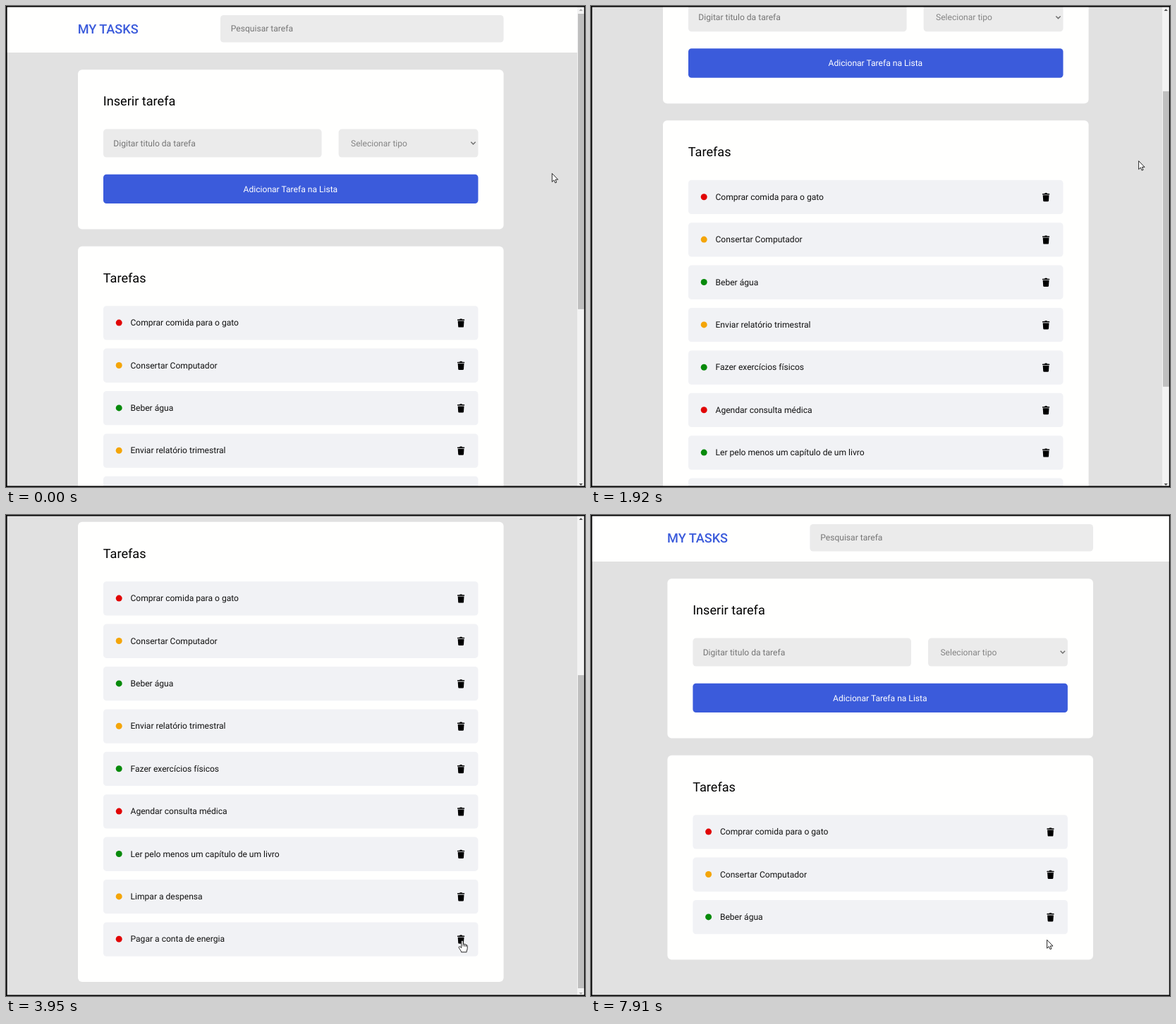
Recreate the animation shown at these times as an HTML page. Size 821 by 682 pixels, loop 8 s.

```html
<!DOCTYPE html>
<html lang="pt-BR">
<head>
<meta charset="utf-8">
<title>My Tasks</title>
<style>
  html, body { margin: 0; width: 100%; height: 100%; overflow: hidden; background: #e1e1e1; }
  svg { display: block; width: 100%; height: 100%; }
  text { font: 400 12.08px Roboto, sans-serif; text-rendering: geometricPrecision; white-space: pre; }
  .head { font-size: 18.12px; }
  .brand { font-size: 18.12px; font-weight: 500; fill: #3b5bdb; }
  .hint { fill: #757575; }
  .field { fill: #ebebeb; }
  .card { fill: #fffffe; }
  .row { fill: #f1f2f5; }
</style>
</head>
<body>
<svg id="stage" viewBox="0 0 821 682"></svg>
<script>
const LOOP = 8000, STEP = 72.2, FIRST = 550;
const PITCH = 60.4, ROW_TOP = 425.2, ROW_H = 48.3;
const VIEW = 680, NOTCH = 75.5;

const RED = '#e10505', AMBER = '#f4a508', GREEN = '#078a0b';
const tasks = [
  ['Comprar comida para o gato', RED],
  ['Consertar Computador', AMBER],
  ['Beber água', GREEN],
  ['Enviar relatório trimestral', AMBER],
  ['Fazer exercícios físicos', GREEN],
  ['Agendar consulta médica', RED],
  ['Ler pelo menos um capítulo de um livro', GREEN],
  ['Limpar a despensa', AMBER],
  ['Pagar a conta de energia', RED],
  ['Organizar a gaveta do quarto', GREEN]
];

// wheel notches: start, duration, distance
const notches = [
  [1050, 200, NOTCH], [1585, 240, NOTCH], [1824, 240, NOTCH],
  [2070, 248, NOTCH], [2320, 240, NOTCH], [2680, 180, 14]
];
const deletions = [3870, 4820, 5540, 6190, 6770, 7340, 7630];

// pointer hot spot: time, x, y
const trail = [
  [0, 774, 237], [500, 774, 237], [694, 776.3, 219.3], [2940, 776.3, 219.3],
  [3570, 647, 603.2], [4560, 647, 603.2], [4600, 646.2, 603.2], [5780, 646.2, 603.2],
  [5810, 646.2, 602.6], [6190, 646.2, 602.6], [6400, 646.8, 605], [6550, 646.4, 603],
  [6770, 646.4, 603], [6900, 646.8, 606], [7050, 646.4, 602.8], [7850, 646.4, 602.8],
  [7900, 646.3, 602], [LOOP, 646.3, 602]
];

const box = (x, y, w, h, r, cls) =>
  `<rect x="${x}" y="${y}" width="${w}" height="${h}" rx="${r}" class="${cls}"/>`;
const label = (x, y, s, cls = '', extra = '') =>
  `<text x="${x}" y="${y}" class="${cls}" ${extra}>${s}</text>`;

const row = ([name, color], i) => `
  <g class="task" transform="translate(0 ${ROW_TOP + i * PITCH})">
    ${box(138, 0, 531.5, ROW_H, 4.5, 'row')}
    <circle cx="160.2" cy="23.9" r="4.5" fill="${color}"/>
    ${label(176.5, 28.1, name, '', 'fill="#111"')}
    <path d="M640 19.7q0-.6.6-.6h2.5l.7-.9h2.6l.7.9h2.5q.6 0 .6.6v.9H640z
      M640.7 21.4h8.8l-.5 7.8q-.1 1.2-1.3 1.2h-5.2q-1.2 0-1.3-1.2z"/>
  </g>`;

const stage = document.getElementById('stage');
stage.innerHTML = `
  <rect width="821" height="682" fill="#e1e1e1"/>
  <g id="page">
    <rect x="-20" y="0" width="860" height="66" fill="#fffffe"/>
    ${label(101.7, 38.6, 'MY TASKS', 'brand')}
    ${box(304, 13, 401.6, 38.5, 4.5, 'field')}
    ${label(318.8, 36.3, 'Pesquisar tarefa', 'hint')}
    ${box(102, 90.2, 603.6, 226.4, 6, 'card')}
    ${label(137.8, 141.2, 'Inserir tarefa', 'head')}
    ${box(138, 174.6, 309.6, 40, 4.5, 'field')}
    ${label(152.3, 198.6, 'Digitar titulo da tarefa', 'hint')}
    ${box(471.6, 174.6, 197.9, 40, 4.5, 'field')}
    ${label(489, 198.6, 'Selecionar tipo', '', 'fill="#858585"')}
    <path d="M659.3 192.8l3.2 3.2 3.2-3.2" fill="none" stroke="#707070" stroke-width="1.5"/>
    <rect x="138" y="238.7" width="531.5" height="41.4" rx="4.5" fill="#3b5bdb"/>
    ${label(403.4, 263.5, 'Adicionar Tarefa na Lista', '', 'text-anchor="middle" fill="#fff"')}
    <rect id="list" x="102" y="340.7" width="603.6" height="10" rx="6" class="card"/>
    ${label(137.8, 391.8, 'Tarefas', 'head')}
    ${tasks.map(row).join('')}
  </g>
  <g id="bar">
    <rect x="810" width="11" height="682" fill="#f3f3f3"/>
    <rect id="thumb" x="811" width="8.8" fill="#bfbfbf"/>
    <path id="up" d="M812.6 7l2.6-3 2.6 3z"/>
    <path id="down" d="M812.6 677l2.6 3 2.6-3z"/>
  </g>
  <path d="M0 0H821V682H0zM1.6 1.5V680.5H819.8V1.5z" fill-rule="evenodd"/>
  <g id="pointer" fill="#fff" stroke="#111" stroke-width=".9" stroke-linejoin="round">
    <path id="arrow" d="M.3 .4V12.3L3 9.8L4.8 13.8L6.7 13L5 9.1H8.7Z"/>
    <path id="hand" d="M-1.3 1.4C-1.3 -.2 1.2 -.2 1.2 1.4V5.4C1.9 4.6 3.3 4.8 3.5 5.8C4.2 5.1 5.5 5.4 5.6 6.5
      C6.4 6.1 7.2 6.7 7.2 7.6V11.5C7.2 13.2 6.1 14.2 6.1 16.6H-1.4C-1.5 14.6 -3.8 12.6 -4.8 10.3
      C-5.3 8.9 -4 8.1 -2.9 9.1L-1.3 10.6ZM1.2 5.2V8.4M3.5 5.8V8.6M5.6 6.5V8.8"/>
  </g>`;

const el = id => document.getElementById(id);
const [page, list, bar, thumb, up, down, pointer, arrow, hand] =
  ['page', 'list', 'bar', 'thumb', 'up', 'down', 'pointer', 'arrow', 'hand'].map(el);
const rows = [...document.querySelectorAll('.task')];

const show = (node, on) => node.setAttribute('display', on ? 'inline' : 'none');
const ease = p => { p = Math.min(1, Math.max(0, p)); return p * p * (3 - 2 * p); };

function pointerAt(t) {
  const i = Math.max(1, trail.findIndex(k => k[0] > t));
  const [t0, x0, y0] = trail[i - 1], [t1, x1, y1] = trail[i];
  const p = ease((t - t0) / (t1 - t0));
  return [x0 + (x1 - x0) * p, y0 + (y1 - y0) * p];
}

function render(t) {
  const s = Math.max(0, FIRST + Math.floor((t - FIRST + 6) / STEP) * STEP);

  const count = tasks.length - deletions.filter(d => t >= d).length;
  const limit = Math.max(0, 391.4 - (tasks.length - count) * PITCH);
  const wheel = notches.reduce((sum, [at, dur, d]) => sum + d * ease((s - at) / dur), 0);
  const scroll = Math.min(wheel, limit);

  page.setAttribute('transform', `translate(${limit ? 0 : 6.4} ${-scroll})`);
  list.setAttribute('height', ROW_TOP + (count - 1) * PITCH + ROW_H + 36.2 - 340.7);
  rows.forEach((r, i) => show(r, i < count));

  show(bar, limit > 0);
  const ratio = 660 / (VIEW + limit);
  thumb.setAttribute('y', 11 + scroll * ratio);
  thumb.setAttribute('height', VIEW * ratio);
  up.setAttribute('fill', scroll > 0.5 ? '#505050' : '#b0b0b0');
  down.setAttribute('fill', scroll < limit - 0.5 ? '#505050' : '#b0b0b0');

  const [x, y] = pointerAt(s);
  const overBin = limit > 0 && y > 595;
  pointer.setAttribute('transform', `translate(${x} ${y})`);
  show(hand, overBin);
  show(arrow, !overBin);
}

const start = performance.now();
function tick() {
  render((performance.now() - start) % LOOP);
  requestAnimationFrame(tick);
}
tick();
</script>
</body>
</html>
```
